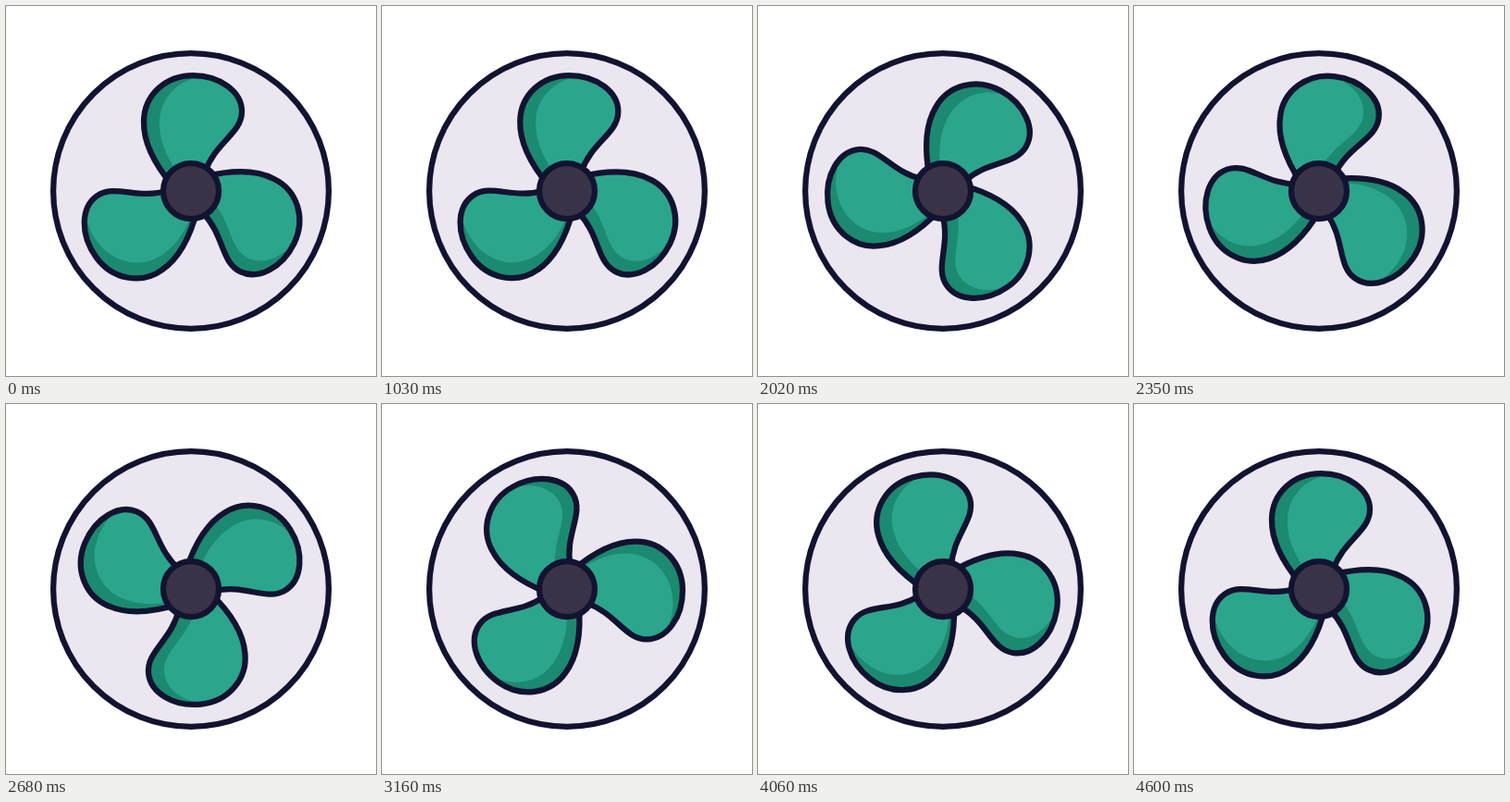
Recreate the animation shown at these times as an HTML page with a canvas. Size 400x400 px, loop 4.63 s.

```html
<!DOCTYPE html>
<html lang="en">
<head>
<meta charset="utf-8">
<title>Fan</title>
<style>
html, body { margin: 0; width: 100%; height: 100%; overflow: hidden; background: #fff; }
canvas { display: block; }
</style>
</head>
<body>
<canvas width="400" height="400"></canvas>
<script>
const ctx = document.querySelector('canvas').getContext('2d');
const LOOP = 4630, START = 1000, SPIN = 3600, TURNS = 3, STEP = 30;
const INK = '#121331';
const RAD = Math.PI / 180;
const LIGHT_SHIFT = 17;
// Each blade's angle, and the direction its lit face is shifted, in degrees.
const BLADES = [
  { angle: 0, light: 3 },
  { angle: 116, light: -60 },
  { angle: 234.3, light: -87 },
];
const blade = new Path2D(
  'M-20-6C-41-31-51.5-53-51-75C-51-103-28-125 2-125C32-125 55-107 55-86' +
  'C55-62 26-53 15-20L10-6Z');

// Cubic bezier easing (.333, 0, .25, 1), solved by bisection.
function ease(x) {
  let low = 0, high = 1, s;
  for (let i = 0; i < 24; i++) {
    s = (low + high) / 2;
    const r = 1 - s;
    if (3 * s * r * r * 0.333 + 3 * s * s * r * 0.25 + s * s * s < x) low = s;
    else high = s;
  }
  return s * s * (3 - 2 * s);
}

function disc(radius, fill) {
  ctx.beginPath();
  ctx.arc(0, 0, radius, 0, 2 * Math.PI);
  ctx.fillStyle = fill;
  ctx.fill();
  ctx.stroke();
}

function drawBlade({ angle, light }) {
  const direction = (light - angle) * RAD;
  ctx.save();
  ctx.rotate(angle * RAD);
  ctx.fillStyle = '#1b8a70';
  ctx.fill(blade);

  ctx.save();
  ctx.clip(blade);
  ctx.translate(LIGHT_SHIFT * Math.cos(direction), LIGHT_SHIFT * Math.sin(direction));
  ctx.fillStyle = '#2ca58d';
  ctx.fill(blade);
  ctx.restore();

  ctx.stroke(blade);
  ctx.restore();
}

function draw(now) {
  const time = Math.floor((now % LOOP - 10) / STEP) * STEP + 10;
  const progress = Math.min(1, Math.max(0, (time - START) / SPIN));
  const turn = progress > 0 && progress < 1 ? ease(progress) * TURNS * 2 * Math.PI : 0;

  ctx.setTransform(1, 0, 0, 1, 200, 200);
  ctx.clearRect(-200, -200, 400, 400);
  ctx.strokeStyle = INK;
  ctx.lineWidth = 6.25;
  ctx.lineJoin = 'round';
  disc(148.9, '#ebe6ef');
  ctx.save();
  ctx.rotate(turn);
  BLADES.forEach(drawBlade);
  ctx.restore();
  disc(30, '#3a3347');
}

function tick() {
  draw(performance.now());
  requestAnimationFrame(tick);
}
tick();
</script>
</body>
</html>
```
